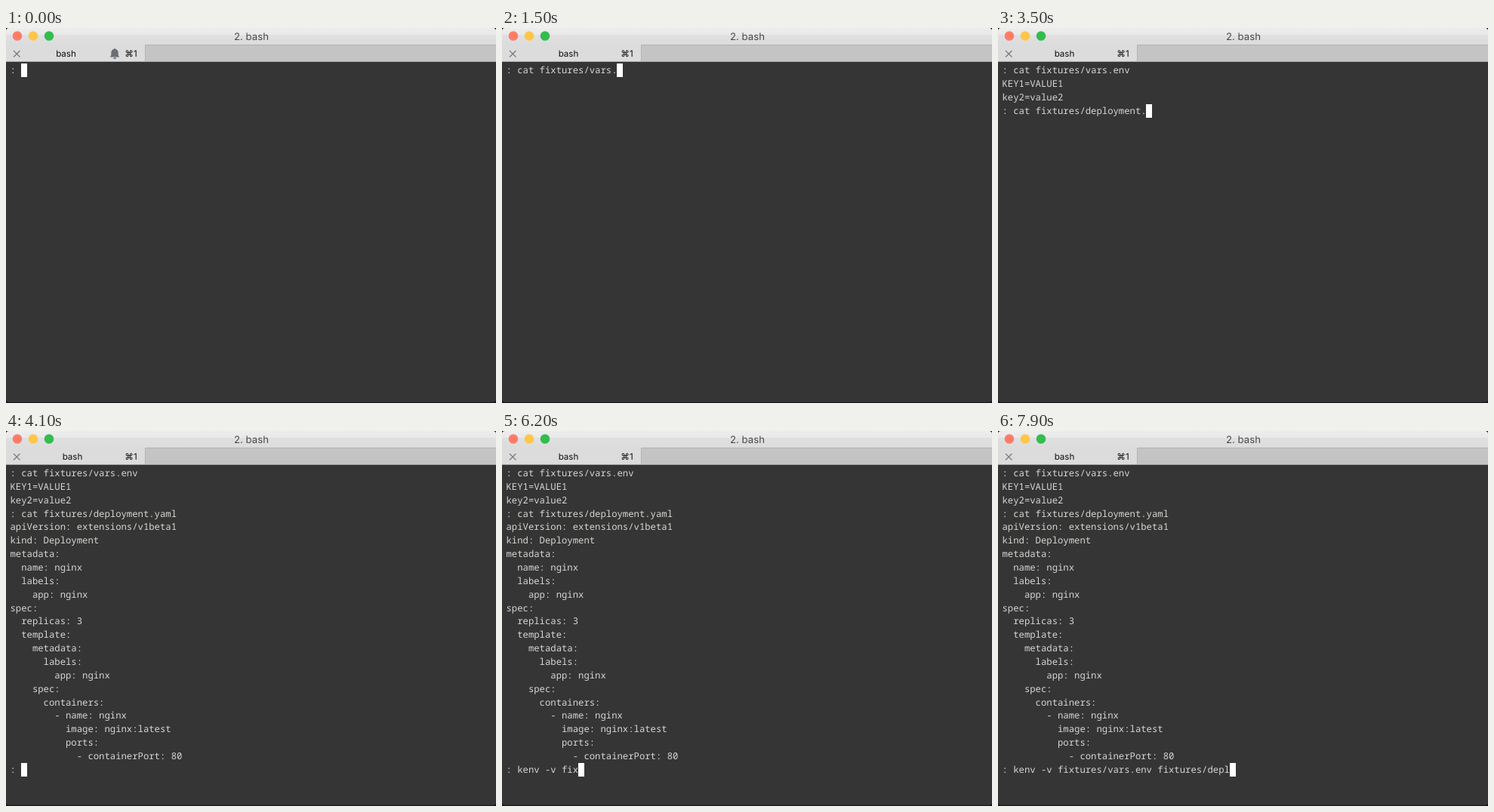
An HTML page that plays this animation: 649 by 497 pixels, repeating every 8000 ms.

```html
<!DOCTYPE html>
<html lang="en">
<head>
<meta charset="utf-8">
<title>Terminal session</title>
<style>
  html, body { margin: 0; width: 100%; height: 100%; overflow: hidden; background: #11131a; }
  svg { display: block; width: 649px; height: 497px; }
  text { white-space: pre; text-rendering: geometricPrecision; }
  .ui { font-family: Inter, "DejaVu Sans", sans-serif; text-anchor: middle; }
  .title { font-size: 13.2px; fill: #4b4b4b; }
  .tab { font-size: 11.6px; fill: #111; }
  .term { font: 12.25px "Noto Sans Mono", "DejaVu Sans Mono", monospace; fill: #d6d6d2; }
</style>
</head>
<body>
<svg viewBox="0 0 649 497" xmlns="http://www.w3.org/2000/svg">
  <defs>
    <linearGradient id="bar" x1="0" y1="0" x2="0" y2="1">
      <stop offset="0" stop-color="#ededed"/>
      <stop offset=".4" stop-color="#e9e9e9"/>
      <stop offset=".4" stop-color="#e0e0e0"/>
      <stop offset="1" stop-color="#dcdcdc"/>
    </linearGradient>
    <clipPath id="window"><rect width="649" height="496" rx="4"/></clipPath>
  </defs>
  <g clip-path="url(#window)">
    <rect width="649" height="497" fill="#353535"/>
    <rect width="649" height="22" fill="url(#bar)"/>
    <rect y="22" width="184" height="22" fill="#dcdcdc"/>
    <rect x="184" y="22" width="465" height="22" fill="#c4c4c4"/>
    <path d="M184.5 44V22.5H649" fill="none" stroke="#b2b2b2"/>
    <rect y="44" width="649" height="1" fill="#a9a9a9"/>
  </g>
  <circle cx="15" cy="10.5" r="6.3" fill="#fd7c68"/>
  <circle cx="36" cy="10.5" r="6.3" fill="#fdc748"/>
  <circle cx="57" cy="10.5" r="6.3" fill="#32bd50"/>
  <text class="ui title" x="325" y="15.7">2. bash</text>
  <path d="M10 30l8.5 8.5M18.5 30L10 38.5" stroke="#777" stroke-width="1.1"/>
  <text id="label" class="ui tab" y="38">bash</text>
  <text class="ui tab" x="165.5" y="38">⌘1</text>
  <path id="bell" fill="#687075" d="M143 28a1 1 0 0 1 2 0q3.7 .8 3.7 5v3l1.6 2.4h-12.600l1.600-2.400v-3q0-4.200 3.700-5zM142 39.200h4a2 2 0 0 1-4 0z"/>
  <rect id="cursor" width="8" height="18" fill="#fff"/>
  <g id="screen" class="term"></g>
</svg>
<script>
const LOOP = 8000, BELL_OFF = 300;
const LEFT = 5.5, TOP = 47, COL = 7.355, ROW = 17.86, BASE = 13;

const vars = "\nKEY1=VALUE1\nkey2=value2\n: ";
const yaml = `
apiVersion: extensions/v1beta1
kind: Deployment
metadata:
  name: nginx
  labels:
    app: nginx
spec:
  replicas: 3
  template:
    metadata:
      labels:
        app: nginx
    spec:
      containers:
        - name: nginx
          image: nginx:latest
          ports:
            - containerPort: 80
: `;

// Each step appends its text; longer pieces are tab completions or output.
const steps = [[0, ": "]];
const type = (start, gap, ...parts) =>
  parts.forEach((part, i) => steps.push([start + i * gap, part]));

type(400, 100, ..."cat fix", "tures/", "v", "ars.");
type(1700, 100, "e", "nv");
type(2000, 100, vars, "", ..."cat", ..." fix", "tures/", ..."dep", "loyment.");
type(3700, 100, "y", "aml");
type(4100, 100, yaml);
type(4500, 150, ..."kenv");
type(5200, 150, ..." -v ", ..."fix");
type(6300, 100, "tures/", "v", "ars.", "", "e", "nv ");
type(7000, 100, ..."fix", "tures/", "", ..."depl");

const find = id => document.getElementById(id);
const [screen, cursor, label, bell] = ["screen", "cursor", "label", "bell"].map(find);
let shown;

function showText(text) {
  if (text === shown) return;
  shown = text;
  const lines = text.split("\n");
  screen.replaceChildren(...lines.map((line, i) => {
    const row = document.createElementNS(screen.namespaceURI, "text");
    row.setAttribute("x", LEFT);
    row.setAttribute("y", TOP + BASE + i * ROW);
    row.textContent = line;
    return row;
  }));
  const last = lines.length - 1;
  cursor.setAttribute("x", Math.round(LEFT - .5 + lines[last].length * COL));
  cursor.setAttribute("y", Math.round(TOP + last * ROW));
}

function draw(now) {
  const time = now % LOOP;
  const ringing = time < BELL_OFF;
  bell.style.display = ringing ? "" : "none";
  label.setAttribute("x", ringing ? 79.5 : 88);
  showText(steps.filter(([at]) => at <= time).map(([, part]) => part).join(""));
}

const start = performance.now();
function tick() {
  draw(performance.now() - start);
  requestAnimationFrame(tick);
}
tick();
</script>
</body>
</html>
```
